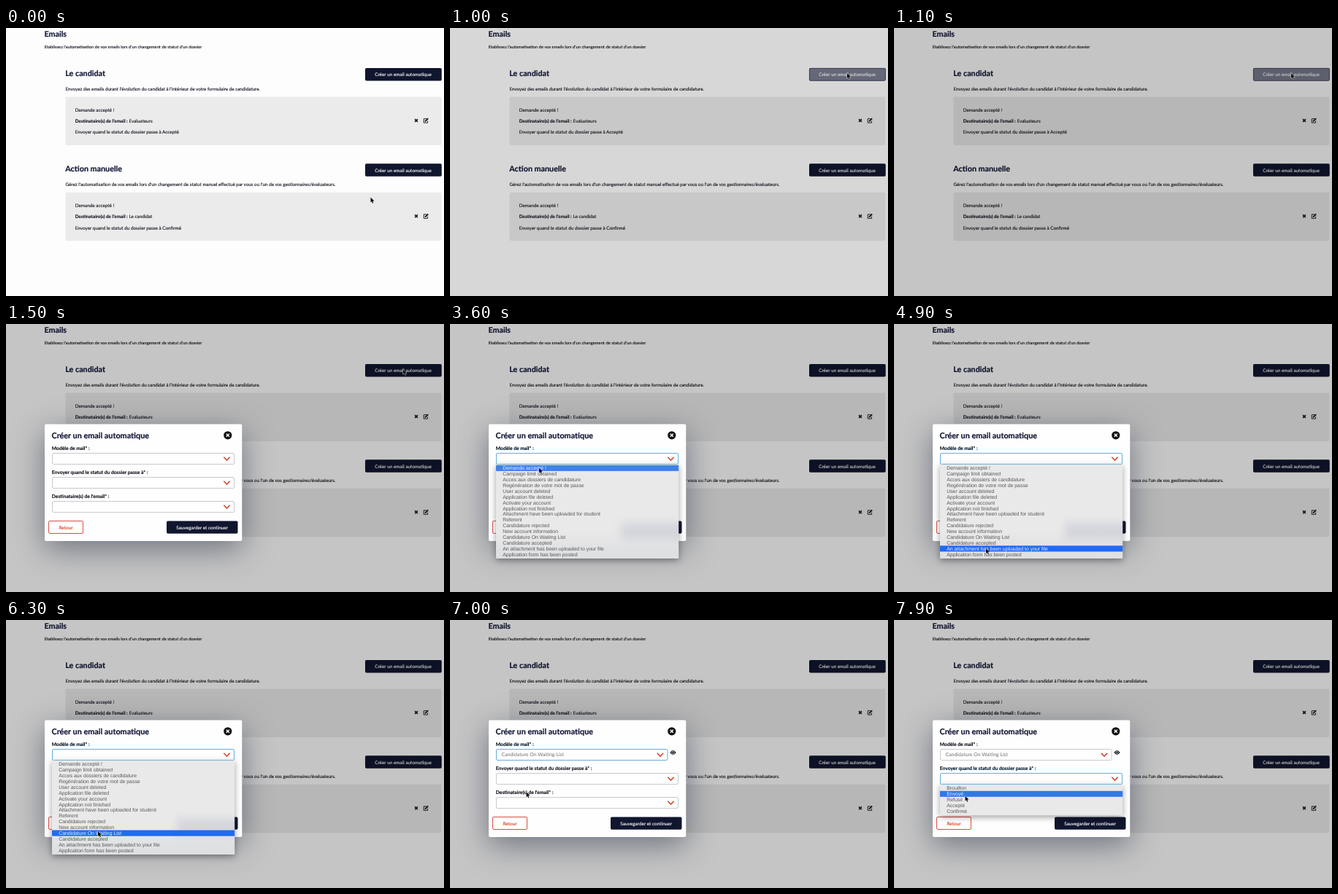
Recreate the animation shown at these times as an HTML page with a canvas. Size 600 by 368 pixels, loop 8000 ms.

```html
<!DOCTYPE html>
<html lang="fr">
<head>
<meta charset="utf-8">
<title>Emails automatiques</title>
<style>
  html, body { margin: 0; width: 100%; height: 100%; overflow: hidden; background: #fdfdfd; }
  canvas { display: block; width: 600px; height: 368px; }
</style>
</head>
<body>
<canvas id="stage"></canvas>
<script>
const W = 600, H = 368, LOOP = 8000, STEP = 100;
const canvas = document.getElementById('stage');
const ctx = canvas.getContext('2d');
const dpr = window.devicePixelRatio || 1;
canvas.width = W * dpr;
canvas.height = H * dpr;

const LATO = 'Lato, sans-serif';
const SANS = '"Liberation Sans", Arial, sans-serif';
const INK = '#11141c', NAVY = '#11162f', TITLE = '#151a38', RED = '#d8382c', CHEVRON = '#de432f';
const BODY = 6.36, INTRO = 6.27, SUB = 5.84, HEAD = 10.75, LABEL = 6.7, ITEM = 6.89;
const ROW = 7.9;

const TEMPLATES = [
  'Demande accepté !', 'Campaign limit obtained', 'Acces aux dossiers de candidature',
  'Regénération de votre mot de passe', 'User account deleted', 'Application file deleted',
  'Activate your account', 'Application not finished',
  'Attachment have been uploaded for student', 'Referent', 'Candidature rejected',
  'New account information', 'Candidature On Waiting List', 'Candidature accepted',
  'An attachment has been uploaded to your file', 'Application form has been posted'
];
const STATUSES = ['Brouillon', 'Envoyé', 'Refusé', 'Accepté', 'Confirmé'];

// Pointer path: time, x, y
const PATH = [
  [0, 499.5, 232.5], [700, 544, 62], [1500, 544, 62], [1700, 478, 63],
  [1900, 150, 200], [2100, 118.5, 182], [2500, 118.5, 182], [2600, 119, 181.5],
  [3200, 119, 181.5], [3600, 122, 197.5], [4100, 125, 263], [4900, 126, 308],
  [5000, 126, 304.6], [5200, 125, 299.5], [5600, 125, 299.5], [5700, 129, 299.5],
  [5800, 129, 299.5], [6300, 126, 290], [6600, 126, 290], [7200, 97, 217],
  [7400, 97, 217], [7900, 97.5, 241.5], [8000, 97.5, 241.5]
];

const clamp = v => Math.max(0, Math.min(1, v));
const ramp = (t, a, b) => clamp((t - a) / (b - a));
const ease = k => k * k * (3 - 2 * k);

function pointerAt(t) {
  const i = Math.max(1, PATH.findIndex(p => p[0] >= t));
  const [t0, x0, y0] = PATH[i - 1], [t1, x1, y1] = PATH[i];
  const k = ease(ramp(t, t0, t1));
  return { x: x0 + (x1 - x0) * k, y: y0 + (y1 - y0) * k };
}

// Text is set at 100px and scaled evenly, so small sizes keep exact spacing.
// The hairline stroke gives it the slightly heavier smoothing of a desktop screen.
function text(s, x, y, size, opt = {}) {
  const { color = INK, weight = 400, font = LATO, align = 'left', heavy = 2 } = opt;
  ctx.save();
  ctx.translate(x, y + size * 0.36);
  ctx.scale(size / 100, size / 100);
  ctx.font = `${weight} 100px ${font}`;
  ctx.textAlign = align;
  ctx.fillStyle = ctx.strokeStyle = color;
  ctx.fillText(s, 0, 0);
  if (heavy) {
    ctx.lineWidth = heavy;
    ctx.lineJoin = 'round';
    ctx.strokeText(s, 0, 0);
  }
  const width = ctx.measureText(s).width * size / 100;
  ctx.restore();
  return width;
}

function box(x, y, w, h, r, fill, stroke, line = 0.9) {
  ctx.beginPath();
  ctx.roundRect(x, y, w, h, r);
  if (fill) { ctx.fillStyle = fill; ctx.fill(); }
  if (stroke) { ctx.strokeStyle = stroke; ctx.lineWidth = line; ctx.stroke(); }
}

function lines(points, color, width) {
  ctx.beginPath();
  points.forEach(([x, y], i) => i ? ctx.lineTo(x, y) : ctx.moveTo(x, y));
  ctx.strokeStyle = color;
  ctx.lineWidth = width;
  ctx.stroke();
}

function cross(x, y, r, color, width) {
  lines([[x - r, y - r], [x + r, y + r]], color, width);
  lines([[x + r, y - r], [x - r, y + r]], color, width);
}

function shadow(color, blur, dy) {
  ctx.shadowColor = color;
  ctx.shadowBlur = blur * dpr;
  ctx.shadowOffsetY = dy * dpr;
}

function editIcon(x, y) {
  lines([[x + 1, y - 2.4], [x - 3, y - 2.4], [x - 3, y + 3.1], [x + 2.3, y + 3.1], [x + 2.3, y + 0.6]], INK, 0.9);
  lines([[x - 1.2, y + 1.3], [x + 2.9, y - 2.8]], INK, 1.8);
}

function eyeIcon(x, y) {
  ctx.beginPath();
  ctx.moveTo(x - 4.1, y);
  ctx.quadraticCurveTo(x, y - 6, x + 4.1, y);
  ctx.quadraticCurveTo(x, y + 6, x - 4.1, y);
  ctx.fillStyle = INK;
  ctx.fill();
  ctx.beginPath();
  ctx.arc(x, y, 1.7, 0, 7);
  ctx.strokeStyle = '#fff';
  ctx.lineWidth = 0.7;
  ctx.stroke();
}

function createButton(y, hover) {
  box(492, y, 104.8, 17.5, 1.8, NAVY);
  if (hover) {
    ctx.save();
    ctx.globalAlpha *= hover;
    box(492.4, y + 0.4, 104, 16.7, 1.8, '#777a8d', '#4d516b');
    ctx.restore();
  }
  text('Créer un email automatique', 544, y + 9, BODY + 0.02, { color: '#fff', align: 'center' });
}

function section(y, title, intro, target, status, hover) {
  text(title, 81.3, y, HEAD, { color: TITLE, weight: 700 });
  createButton(y - 7, hover);
  text(intro, 81.5, y + 21.6, INTRO);
  box(81.5, y + 32.4, 515, 66.6, 2.2, '#ebebeb');
  text('Demande accepté !', 94.7, y + 50.5, BODY);
  const w = text("Destinataire(s) de l'email : ", 94.7, y + 65.9, BODY, { weight: 700 });
  text(target, 94.9 + w, y + 65.9, BODY);
  text('Envoyer quand le statut du dossier passe à ' + status, 94.7, y + 81.1, BODY);
  cross(562, y + 65, 1.9, INK, 1.5);
  editIcon(575.3, y + 65);
}

function page(hover) {
  ctx.fillStyle = '#fdfdfd';
  ctx.fillRect(0, 0, W, H);
  text('Emails', 52.4, 7.8, HEAD, { color: TITLE, weight: 700 });
  text("Etablissez l'automatisation de vos emails lors d'un changement de statut d'un dossier", 52.7, 25.4, SUB);
  section(62, 'Le candidat',
    "Envoyez des emails durant l'évolution du candidat à l'intérieur de votre formulaire de candidature.",
    'Evaluateurs', 'Accepté', hover);
  section(193.3, 'Action manuelle',
    "Gérez l'automatisation de vos emails lors d'un changement de statut manuel effectué par vous ou l'un de vos gestionnaires/évaluateurs.",
    'Le candidat', 'Confirmé', 0);
}

function field(y, label, opt = {}) {
  const { value = '', focus = false, width = 249 } = opt;
  text(label, 62.8, y - 14.2, LABEL, { weight: 700 });
  box(63.5, y - 7.3, width, 15, 1.4, '#fff', focus ? '#55a5dc' : '#c4c4c4');
  if (value) text(value, 70.6, y - 0.2, 6.88, { color: '#6c6c6c', heavy: 0 });
  const x = 63.5 + width - 10;
  lines([[x - 4.2, y - 2], [x, y + 2.3], [x + 4.2, y - 2]], CHEVRON, 1.6);
}

function modal(t) {
  const k = ramp(t, 1100, 1500);
  if (!k) return;
  ctx.save();
  ctx.globalAlpha = k;
  ctx.translate(0, -20 * (1 - ease(k)));
  ctx.save();
  shadow('rgba(35,42,66,.52)', 42, 11);
  box(53, 137.4, 270.3, 160.6, 2, '#fefefe');
  ctx.restore();
  text('Créer un email automatique', 62.5, 153.2, HEAD + 0.08, { color: TITLE, weight: 700 });
  ctx.beginPath();
  ctx.arc(303.8, 152.8, 5.6, 0, 7);
  ctx.fillStyle = '#111';
  ctx.fill();
  cross(303.8, 152.8, 2, '#fff', 1.5);

  const chosen = t >= 6700;
  field(184.8, 'Modèle de mail* :', {
    value: chosen ? TEMPLATES[12] : '',
    width: chosen ? 234.5 : 249,
    focus: t >= 2900 && t < 7500
  });
  if (chosen) eyeIcon(305.5, 182);
  field(217.8, 'Envoyer quand le statut du dossier passe à* :', { focus: t >= 7500 });
  field(250.8, "Destinataire(s) de l'email* :");
  box(58.5, 270.5, 47, 17, 1.6, '#fff', RED);
  text('Retour', 82.1, 279.4, BODY + 0.1, { color: RED, align: 'center' });
  box(220, 270.5, 97.5, 17.3, 1.8, NAVY);
  text('Sauvegarder et continuer', 268.7, 279.3, BODY + 0.06, { color: '#fff', align: 'center' });
  ctx.restore();
}

// The highlight is translucent: paler near the top, deeper lower down.
function highlight() {
  const g = ctx.createLinearGradient(0, 195, 0, 290);
  g.addColorStop(0, '#4082e8');
  g.addColorStop(1, '#1f6cec');
  return g;
}

function popup(top, items, alpha, active) {
  if (alpha <= 0) return;
  const h = items.length * ROW + 3;
  ctx.save();
  ctx.globalAlpha = alpha;
  ctx.save();
  shadow('rgba(0,0,0,.38)', 9, 2.5);
  box(63, top, 250.2, h, [0, 0, 1.5, 1.5], '#e9e9e9');
  ctx.restore();

  // Dark button and backdrop glimmer through the long list.
  if (h > 80) {
    ctx.save();
    ctx.beginPath();
    ctx.rect(63, top, 250.2, h);
    ctx.clip();
    const fade = ctx.createLinearGradient(0, 285, 0, 312);
    fade.addColorStop(0, 'rgba(215,217,220,0)');
    fade.addColorStop(1, 'rgba(215,217,220,.55)');
    ctx.fillStyle = fade;
    ctx.fillRect(63, 285, 251, 40);
    ctx.filter = `blur(${6 * dpr}px)`;
    ctx.fillStyle = 'rgba(80,90,140,.13)';
    ctx.fillRect(234, 273, 90, 22);
    ctx.restore();
  }

  items.forEach((item, i) => {
    const y = top + 1.1 + i * ROW;
    const on = i === active;
    if (on) {
      ctx.fillStyle = highlight();
      ctx.fillRect(63, y, 250.2, 8.1);
    }
    text(item, 72.2, y + 4, ITEM, { font: SANS, color: on ? '#e8f0ff' : '#585858', heavy: 0 });
  });
  ctx.restore();
}

function activeRow(p, top, count) {
  const i = Math.floor((p.y - top - 1.1) / ROW);
  return i >= 0 && i < count ? i : -1;
}

function pointer({ x, y }) {
  const shape = [[0, 0], [0, 7.1], [1.6, 5.7], [2.7, 8.2], [3.9, 7.7], [2.8, 5.2], [5, 5.1]];
  ctx.beginPath();
  shape.forEach(([dx, dy], i) => i ? ctx.lineTo(x + dx, y + dy) : ctx.moveTo(x, y));
  ctx.closePath();
  ctx.lineJoin = 'round';
  ctx.strokeStyle = 'rgba(255,255,255,.8)';
  ctx.lineWidth = 1;
  ctx.stroke();
  ctx.fillStyle = '#0a0a0a';
  ctx.fill();
  ctx.lineJoin = 'miter';
}

function draw(t) {
  const p = pointerAt(t);
  ctx.setTransform(dpr, 0, 0, dpr, 0, 0);
  ctx.textRendering = 'geometricPrecision';

  const over = t < 1600 && p.y < 73 ? 1 : 0;
  page(over * (1 - ramp(t, 1100, 1400)));

  ctx.fillStyle = `rgba(0,0,0,${0.225 * ramp(t, 800, 1100)})`;
  ctx.fillRect(0, 0, W, H);
  modal(t);

  const blink = t === 6500;
  popup(192.7, TEMPLATES, ramp(t, 2800, 3000) * (1 - ramp(t, 6600, 6800)),
    blink ? -1 : t >= 6500 ? 12 : activeRow(p, 192.7, TEMPLATES.length));
  popup(225.7, STATUSES, ramp(t, 7400, 7500), activeRow(p, 225.7, STATUSES.length));
  pointer(p);
}

const start = performance.now();
function tick(now) {
  const t = Math.max(0, now - start) % LOOP;
  draw(Math.floor(t / STEP) * STEP);
  requestAnimationFrame(tick);
}
draw(0);
requestAnimationFrame(tick);
</script>
</body>
</html>
```
